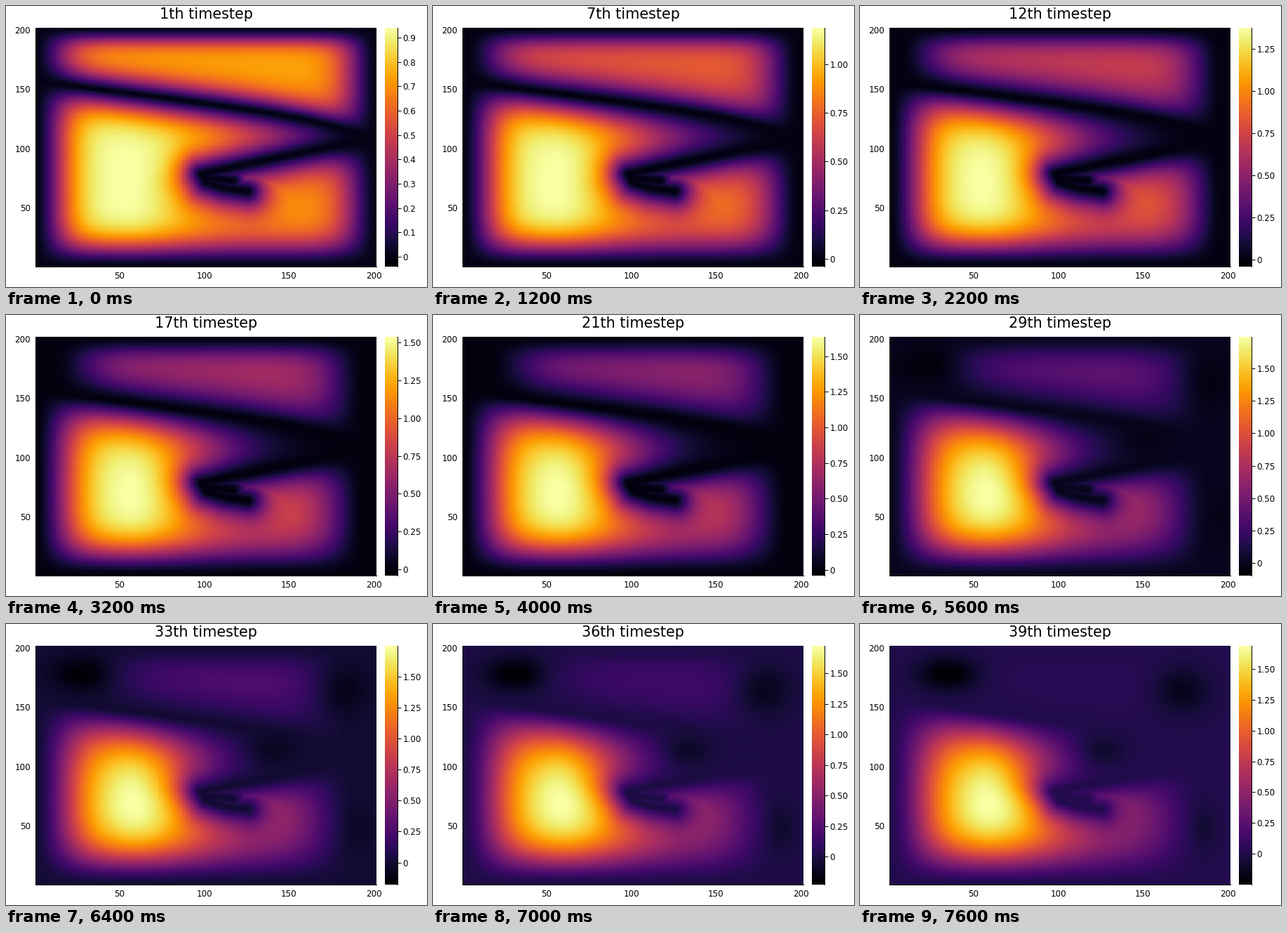
Write a matplotlib script that moves like this. It is 600 px wide and 400 px high and loops after 7800 ms.

```python
import numpy as np
import matplotlib.pyplot as plt
from matplotlib.animation import FuncAnimation

plt.rcParams["font.family"] = "DejaVu Sans"
W, H, DPI = 600, 400, 100
STEPS, N = 39, 201
PT = 72 / DPI
LEFT, RIGHT, TOP, BOTTOM = 42, 528, 31, 371

# Cell centres in stage pixels
cells = (np.arange(N) + 0.5) / N
x, y = np.meshgrid(LEFT + (RIGHT - LEFT) * cells,
                   BOTTOM - (BOTTOM - TOP) * cells)


def mix(a, b, s):
    return a + (b - a) * s


def smooth(s):
    s = np.clip(s, 0, 1)
    return s * s * (3 - 2 * s)


def rise(d, width, power=1.8):
    """Grow from 0 at a wall to 1 far away from it."""
    return 1 - np.exp(-(np.maximum(d, 0) / width) ** power)


def fade(start, width, tail):
    """Fall from 1 to the tail, going right."""
    return tail + (1 - tail) * np.exp(-(np.maximum(x - start, 0) / width) ** 2)


def bump(cx, cy, sx, sy):
    return np.exp(-((x - cx) / sx) ** 2 / 2 - ((y - cy) / sy) ** 2 / 2)


def segment_dist(a, b):
    (x0, y0), (dx, dy) = a, np.subtract(b, a)
    s = np.clip(((x - x0) * dx + (y - y0) * dy) / (dx * dx + dy * dy), 0, 1)
    return np.hypot(x - x0 - s * dx, y - y0 - s * dy)


# Long curved wall, and the hooked wall that meets it on the right
curve = 107 + 0.13 * (x - 43) + 20 * ((x - 43) / 485) ** 6
hook = [(528, 186), (278, 239), (285, 251), (310, 259), (345, 264)]
inside = [(284, 245), (324, 249)]
hook_dist = np.minimum.reduce(
    [segment_dist(*ends) for ends in [*zip(hook, hook[1:]), inside]]) - 1.5
hook_line = 239 - 0.212 * np.maximum(x - 278, 0)
under = 1 / (1 + np.exp(-(y - hook_line - 3) / 8))


def limits(s):
    late = smooth((s - 0.6) / 0.4)
    return -0.04 - 0.21 * late, 0.94 + 0.81 * np.sin(np.pi * s / 1.6)


def field(s, high):
    edge = mix(47, 71, s)
    wall = mix(27, 52, s)
    right = rise(mix(528, 486, s) - x, edge)

    arm = fade(170, mix(95, 130, s), mix(0.76, 0.33, s))
    wedge = fade(170, mix(200, 108, s), 0.65 * (1 - s) ** 6)
    lower = (mix(wedge, arm, under) * right
             * rise(hook_dist, 27, 1.4)
             * rise(x - LEFT, edge)
             * rise(BOTTOM - y, 0.75 * edge)
             * rise(y - curve - 1, wall, 1.4))
    lower *= high / lower.max()

    strip = ((0.75 * (1 - s ** 3) + 0.05 * s) * right
             * rise(x - mix(LEFT, 140, s ** 1.5), edge)
             * rise(y - TOP, 0.47 * edge)
             * rise(curve - y - 1, 0.85 * wall, 1.4))

    # Hollows that deepen and drift near the end
    q = (s - 0.84) / 0.16
    dips = (bump(108 + 17 * q, 71, 30, 17)
            + 0.64 * bump(475 - 18 * q, 95, 28, 24)
            + 0.55 * bump(375 - 35 * q, 182, 26, 16)
            + 0.3 * bump(505 - 13 * q, 290, 13, 23))
    return lower + strip - 0.25 * smooth((s - 0.6) / 0.4) * dips


fig = plt.figure(figsize=(W / DPI, H / DPI), dpi=DPI, facecolor="white")


def pixel_axes(x0, x1):
    return fig.add_axes([x0 / W, 1 - BOTTOM / H,
                         (x1 - x0) / W, (BOTTOM - TOP) / H])


ax = pixel_axes(LEFT, RIGHT)
image = ax.imshow(np.zeros((N, N)), cmap="inferno", origin="lower",
                  aspect="auto", interpolation="nearest",
                  extent=(0.5, N + 0.5, 0.5, N + 0.5))
ax.set_xticks(range(50, 201, 50))
ax.set_yticks(range(50, 201, 50))
ax.tick_params(length=0, labelsize=11.9 * PT)
ax.tick_params(axis="x", pad=7.5 * PT)
ax.tick_params(axis="y", pad=7 * PT)

bar = pixel_axes(540, 558)
bar.imshow(np.linspace(0, 1, 256)[:, None], cmap="inferno", origin="lower",
           aspect="auto", extent=(0, 1, 0, 1))
bar.set_xticks([])
bar.yaxis.tick_right()
bar.tick_params(axis="y", length=5 * PT, width=PT, pad=2.5 * PT,
                labelsize=11.9 * PT)

for axes, shown in ((ax, ("left", "bottom")), (bar, ("right",))):
    for side, spine in axes.spines.items():
        spine.set_visible(side in shown)
        spine.set_linewidth(PT)

title = fig.text(285 / W, 1 - 18.5 / H, "", ha="center", va="baseline",
                 fontsize=20.8 * PT)


def draw(i):
    s = i / (STEPS - 1)
    low, high = limits(s)
    image.set_data(field(s, high))
    image.set_clim(low, high)

    gap, digits = (0.1, 1) if high < 1 else (0.25, 2)
    ticks = np.arange(int(high / gap) + 1) * gap
    bar.set_yticks((ticks - low) / (high - low),
                   ["0" if v == 0 else f"{v:.{digits}f}" for v in ticks])
    bar.set_ylim(0, 1)
    title.set_text(f"{i + 1}th timestep")
    return image, title


anim = FuncAnimation(fig, draw, frames=STEPS, interval=200, repeat=True,
                     repeat_delay=0, blit=False)
plt.show()
```
